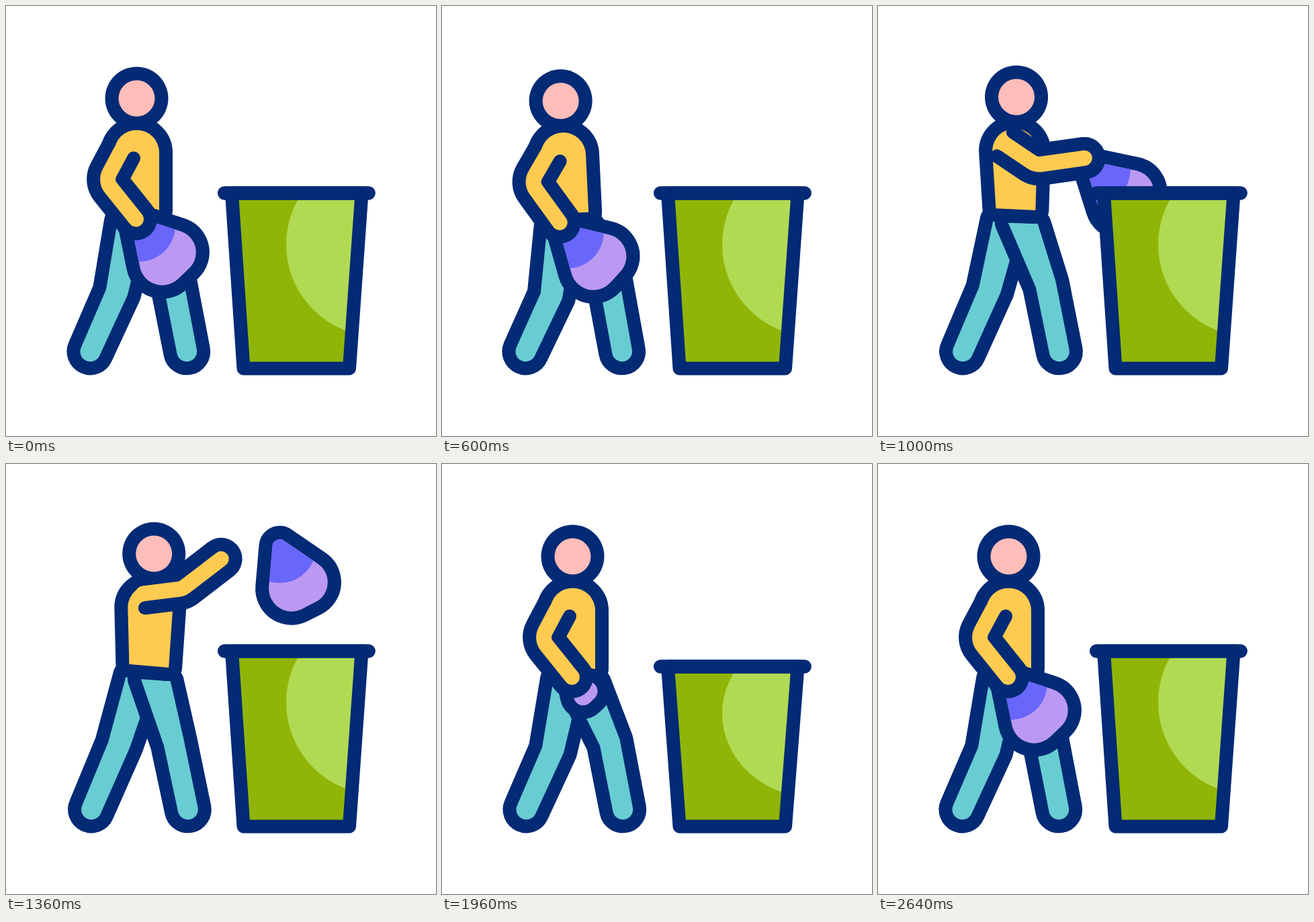
Animation of 640x640 px, one loop 3000 ms. Source, as an HTML page with a canvas:

```html
<!DOCTYPE html>
<html lang="en">
<head>
<meta charset="utf-8">
<title>Throwing out the trash</title>
<style>
  html, body { margin: 0; width: 100%; height: 100%; overflow: hidden; background: #fff; }
  canvas { display: block; width: 640px; height: 640px; }
</style>
</head>
<body>
<canvas id="stage" width="640" height="640"></canvas>
<script>
const ctx = document.getElementById('stage').getContext('2d');
const LOOP = 3000, STEP = 40, LINE = 20;
const NAVY = '#032a75', TEAL = '#67cdd2', YELLOW = '#fecb50', PINK = '#febdb8',
      LILAC = '#bb99f2', INDIGO = '#6966fa', GREEN = '#90b507', LIME = '#b1da53';

// Angles in degrees; the forearm has a fixed length
const REST = { lean: 0, armX: -23.5, armY: -1.5, upper: 118, length: 49.5, fore: 51.3 };
const BACK = { ...REST, lean: -2.75, upper: 120, fore: 54 };
const THROW = { lean: 3.92, armX: -10.5, armY: -21, upper: -7, length: 58.5, fore: -37.5 };
const FOREARM = 73;

const RELEASE = 1160, APEX = 1360, LANDING = 1600, REGROW = 1880, GROWN = 2640;
const GRAVITY = 0.00122;

const rad = deg => deg * Math.PI / 180;
const clamp = p => Math.min(1, Math.max(0, p));
const progress = (t, from, to) => clamp((t - from) / (to - from));
const mix = (a, b, p) => a + (b - a) * p;
const easeOut = p => 1 - (1 - p) ** 2;

function smooth(t, from, to) {
  const p = progress(t, from, to);
  return p * p * (3 - 2 * p);
}

function easeOutBack(p) {
  const c = 1.7, u = p - 1;
  return 1 + (c + 1) * u ** 3 + c * u * u;
}

function rotate([x, y], deg, [px, py] = [0, 0]) {
  const c = Math.cos(rad(deg)), s = Math.sin(rad(deg));
  return [px + (x - px) * c - (y - py) * s, py + (x - px) * s + (y - py) * c];
}

function polar([x, y], deg, length) {
  return [x + length * Math.cos(rad(deg)), y + length * Math.sin(rad(deg))];
}

function stroke(path, width, color, cap = 'round') {
  ctx.lineWidth = width;
  ctx.strokeStyle = color;
  ctx.lineCap = cap;
  ctx.lineJoin = 'round';
  ctx.stroke(path);
}

// Shape with the outline lying outside its fill
function outlined(path, color) {
  stroke(path, LINE * 2, NAVY);
  ctx.fillStyle = color;
  ctx.fill(path);
}

function dot([x, y], r, color) {
  ctx.fillStyle = color;
  ctx.beginPath();
  ctx.arc(x, y, r, 0, Math.PI * 2);
  ctx.fill();
}

function polyline(points) {
  const path = new Path2D();
  points.forEach(p => path.lineTo(...p));
  return path;
}

// Body pose: wind up, throw, return to rest
function poseAt(t) {
  const wind = smooth(t, 220, 560) - smooth(t, 1220, APEX);
  const reach = smooth(t, 640, 1220) - smooth(t, APEX, 1760);
  const pose = {};
  for (const key in REST) {
    const lift = key === 'armY' ? reach * reach : reach;
    pose[key] = mix(mix(REST[key], BACK[key], wind), THROW[key], lift);
  }
  const { lean } = pose;
  pose.place = point => rotate(point, lean, [265, 511]);
  pose.shoulder = pose.place([194.5, 218]);
  pose.start = [pose.shoulder[0] + pose.armX, pose.shoulder[1] + pose.armY];
  pose.elbow = polar(pose.start, pose.upper, pose.length);
  pose.hand = polar(pose.elbow, pose.fore, FOREARM);
  return pose;
}

function carriedBag(t) {
  const swing = smooth(t, 240, 800);
  const [x, y] = poseAt(t).hand;
  return { x: x + 4.5 + 10 * swing, y: y + 9.5 + 7 * swing, angle: -18 - 6 * swing, scale: 1 };
}

function flyingBag(t) {
  const from = carriedBag(RELEASE);
  const p = easeOut(progress(t, RELEASE, LANDING));
  return {
    x: mix(from.x, 438, p),
    y: 123 + GRAVITY * (t - APEX) ** 2,
    angle: mix(from.angle, 8, p),
    scale: 1
  };
}

function growingBag(t) {
  const full = carriedBag(0), [x, y] = poseAt(0).hand;
  const scale = easeOutBack(progress(t, REGROW, GROWN));
  return { x: mix(x, full.x, scale), y: mix(y, full.y, scale), angle: full.angle, scale };
}

function bagAt(t) {
  if (t < RELEASE) return carriedBag(t);
  return t < REGROW ? flyingBag(t) : growingBag(t);
}

function drawLeg(hipL, kneeL, foot, tilt, kneeR, hipR) {
  const path = polyline([hipL, kneeL]);
  path.arc(...foot, 15, rad(180 + tilt), rad(tilt), true);
  path.lineTo(...kneeR);
  path.lineTo(...hipR);
  path.closePath();
  outlined(path, TEAL);
}

function drawLegs({ lean, place }) {
  const step = lean * 0.4;
  const bend = ([x, y]) => [x + lean * 0.8, y - lean * 2];
  drawLeg(place([166, 320]), bend([149, 422]), [125.5 + step, 514.3], 24,
    bend([181, 430]), place([206, 325]));
  drawLeg(place([188, 325]), [235, 419], [269.2 + step, 514.3], -11.3,
    [264.5, 410], place([232, 325]));
}

function drawTorso({ lean, place, shoulder }) {
  const path = polyline([place([169, 304]), place([161, 218])]);
  path.arc(...shoulder, 33.5, rad(180 + lean), rad(lean));
  path.lineTo(...place([228, 305]));
  path.closePath();
  outlined(path, YELLOW);
}

function drawArm({ start, elbow, hand, upper }) {
  const path = polyline([start]);
  path.arcTo(...elbow, ...hand, 20);
  path.lineTo(...hand);
  stroke(path, 63, NAVY, 'butt');
  dot(hand, 31.5, NAVY);
  for (const side of [-90, 90]) dot(polar(start, upper + side, 21.5), 10, NAVY);
  stroke(path, 23, YELLOW);
}

// Outline around circles given in clockwise order
function hull(circles) {
  const n = circles.length;
  const normals = circles.map(([x, y, r], i) => {
    const [x2, y2, r2] = circles[(i + 1) % n];
    return Math.atan2(y2 - y, x2 - x) - Math.acos((r - r2) / Math.hypot(x2 - x, y2 - y));
  });
  const path = new Path2D();
  circles.forEach(([x, y, r], i) => path.arc(x, y, r, normals[(i + n - 1) % n], normals[i]));
  path.closePath();
  return path;
}

function drawBag({ x, y, angle, scale }) {
  if (scale < 0.01) return;
  const path = hull([[0, 0, 11], [37, 54, 33], [16, 63, 34]].map(([cx, cy, r]) => {
    const [dx, dy] = rotate([cx, cy], angle);
    return [x + dx * scale, y + dy * scale, r * scale];
  }));
  outlined(path, LILAC);
  ctx.save();
  ctx.clip(path);
  dot([x, y], 54 * scale, INDIGO);
  ctx.restore();
}

function drawBin(t) {
  const height = 1 - 0.089 * (smooth(t, 1740, 1940) - smooth(t, 1940, 2320));
  const base = 539.5;
  const level = y => base - (base - y) * height;
  const top = level(278.5);
  const path = polyline([[336, top], [353.5, base], [511, base], [529.5, top]]);
  path.closePath();
  ctx.fillStyle = GREEN;
  ctx.fill(path);
  ctx.save();
  ctx.clip(path);
  ctx.fillStyle = LIME;
  ctx.beginPath();
  ctx.ellipse(554, level(355), 137, 137 * height, 0, 0, Math.PI * 2);
  ctx.fill();
  ctx.restore();
  stroke(path, LINE, NAVY);
  stroke(polyline([[325.2, top], [539.6, top]]), LINE + 0.5, NAVY);
}

function draw(t) {
  const pose = poseAt(t);
  const head = pose.place([194.5, 137.5]);
  ctx.fillStyle = '#fff';
  ctx.fillRect(0, 0, 640, 640);
  drawLegs(pose);
  drawTorso(pose);
  dot(head, 47, NAVY);
  drawBag(bagAt(t));
  drawArm(pose);
  dot(head, 27, PINK);
  drawBin(t);
}

function tick() {
  const t = performance.now() % LOOP;
  draw(Math.floor(t / STEP) * STEP);
  requestAnimationFrame(tick);
}
tick();
</script>
</body>
</html>
```
